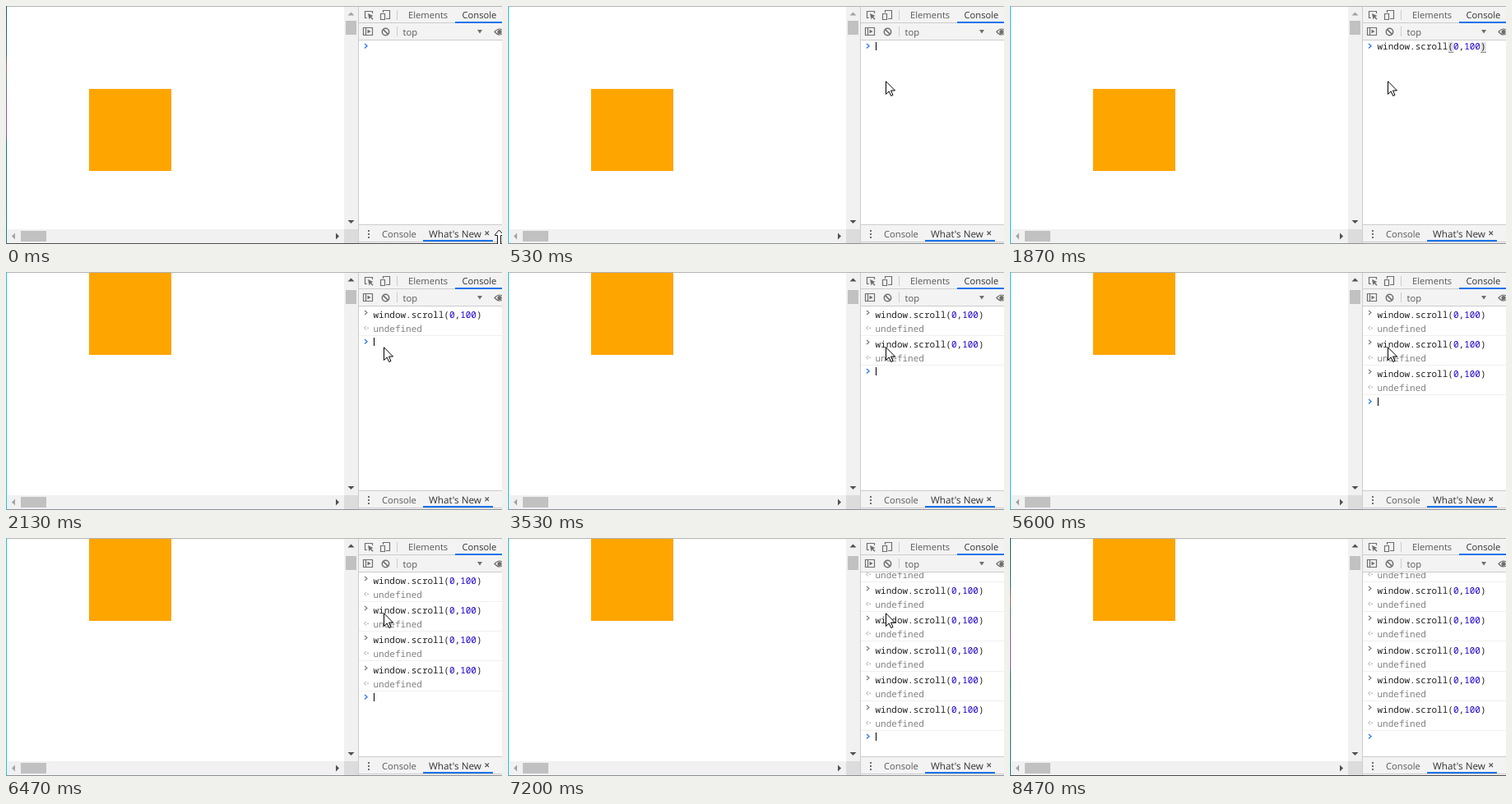
Write an HTML page that moves like this. It is 603 by 290 pixels and loops after 8.59 s.

```html
<!DOCTYPE html>
<html lang="en">
<head>
<meta charset="utf-8">
<title>Scrolling from the console</title>
<style>
  html, body { margin: 0; width: 603px; height: 290px; overflow: hidden; background: #fff; }
  svg { display: block; }
  text { white-space: pre; text-rendering: geometricPrecision; }
  .ui { font: 11.2px "Open Sans", "Noto Sans", sans-serif; fill: #5a5a5a; }
  .ui .active { fill: #333; }
  .code { font: 11px "Noto Sans Mono", "DejaVu Sans Mono", monospace; fill: #222; }
  .num { fill: #1c00cf; }
  .result { fill: #808080; }
  .icon { fill: none; stroke: #6e6e6e; stroke-width: 1.2; }
</style>
</head>
<body>
<svg width="603" height="290" viewBox="0 0 603 290">
  <defs>
    <linearGradient id="desktop" x1="0" y1="0" x2="0" y2="1">
      <stop offset="0" stop-color="#17616b"/>
      <stop offset=".2" stop-color="#2b6f78"/>
      <stop offset=".26" stop-color="#b0695f"/>
      <stop offset=".3" stop-color="#4b7f86"/>
      <stop offset=".42" stop-color="#8a5a9c"/>
      <stop offset=".54" stop-color="#8a5a9c"/>
      <stop offset=".58" stop-color="#17757a"/>
      <stop offset="1" stop-color="#1d8080"/>
    </linearGradient>
    <clipPath id="logArea"><path d="M429 42H603V266H429Z"/></clipPath>
  </defs>
  <path fill="#fff" d="M0 0H603V290H0Z"/>

  <rect id="box" x="101" y="101" width="100" height="100" fill="#ffa500"/>

  <g id="scrollbars">
    <path fill="#f1f1f1" d="M411 1H428V272H411ZM1 272H411V289H1Z"/>
    <path fill="#dcdcdc" d="M411 272H428V289H411Z"/>
    <rect id="thumb" x="413" y="18" width="13" height="17" fill="#c1c1c1"/>
    <path fill="#c1c1c1" d="M18 274H49V287H18Z"/>
    <path id="upArrow" d="M415.5 11.5L419.5 7.5L423.5 11.5Z"/>
    <path fill="#505050" d="M415.5 261L419.5 265L423.5 261ZM401 276.5L405 280.5L401 284.5Z"/>
    <path fill="#a3a3a3" d="M11 276.5L7 280.5L11 284.5Z"/>
  </g>

  <g id="log" clip-path="url(#logArea)">
    <g id="rows"></g>
    <g id="prompt">
      <path d="M436 46L439 48.7L436 51.4" fill="none" stroke="#367cf1" stroke-width="1.4"/>
      <g id="typed">
        <path fill="#e2e2e2" d="M532.8 44h6.6v12h-6.6zM572.2 44h6.6v12h-6.6z"/>
        <path fill="#8c8c8c" d="M533 56h6v1h-6zM572 56h7v1h-7z"/>
        <text class="code" x="446.5" y="53">window.scroll(<tspan class="num">0</tspan>,<tspan class="num">100</tspan>)</text>
      </g>
      <rect id="caret" x="447" y="44" width="1" height="10" fill="#000"/>
    </g>
  </g>

  <g id="toolbars">
    <path fill="#f3f3f3" d="M429 1H603V41H429ZM429 267H603V289H429Z"/>
    <path fill="#ccc" d="M428 1h1V289h-1zM429 20H603v1H429zM429 41H603v1H429zM429 266H603v1H429zM429 287H603v1H429zM475 5h1v12h-1zM475 25h1v12h-1z"/>
    <path fill="#1a73e8" d="M546 19H603v2H546zM507 285H592v2H507z"/>
    <g class="icon">
      <path d="M439 14.5H436.5V6.5H445.5V9"/>
      <path d="M458.5 8V5.5H466.5V15.5H462M455.5 9.5H460.5V16.5H455.5Z"/>
      <path d="M434.5 26.5H445.5V35.5H434.5ZM437.5 26.5V35.5"/>
      <circle cx="461.5" cy="31.5" r="4.2" stroke-width="1.5"/>
      <path d="M458.6 28.6L464.4 34.4" stroke-width="1.5"/>
      <path d="M594 31.5Q600 24.5 606 31.5Q600 38.5 594 31.5Z"/>
    </g>
    <path fill="#6e6e6e" d="M440 9L446.5 12L444 13L446.5 15.8L445.5 16.8L442.8 14L441.5 16.5ZM439.5 28.5L443.5 31L439.5 33.5ZM573 29H579L576 33.5Z"/>
    <circle cx="600" cy="31.5" r="2.6" fill="#6e6e6e"/>
    <path fill="#6e6e6e" d="M440 273h2v2h-2zM440 277h2v2h-2zM440 281h2v2h-2z"/>
    <g class="ui">
      <text x="489" y="15">Elements</text>
      <text class="active" x="554.5" y="15">Console</text>
      <text x="482.5" y="36">top</text>
      <text x="457" y="282">Console</text>
      <text class="active" x="514" y="282" font-size="11.7" style="font-size:11.7px">What's New</text>
    </g>
    <path d="M582.5 274.5L587 279M587 274.5L582.5 279" stroke="#555" stroke-width="1.1"/>
  </g>

  <path fill="#b4b4b4" d="M0 0H603V1H0Z"/>
  <rect id="bottomEdge" y="289" width="603" height="1"/>
  <rect id="leftEdge" width="1" height="290"/>

  <path id="resizeCursor" fill="#fff" stroke="#111" d="M599.5 273L604.5 278.5V279.5H601.5V291H597.5V279.5H594.5V278.5Z"/>
  <path id="arrowCursor" fill="#fff" stroke="#000" stroke-linejoin="miter" d="M.5 .8V16.5L4.2 13L6.7 18.5L9 17.5L6.5 12H11.5Z"/>
</svg>
<script>
const LOOP = 8590, ROW = 36.2, BLINK = 530, STEP = 67;
const FOCUS = 135, BLUR = 8470, MOVE_IN = 70, MOVE_OUT = 7730;
const REST = [459, 91];

// Console states: start, finished commands, command typed, start of caret blinking
const states = [
  [0, 0, false, 140],
  [1330, 0, true],
  [2130, 1, false],
  [3000, 1, true],
  [3530, 2, false, 3470],
  [4200, 2, true],
  [4730, 3, false],
  [5200, 3, true],
  [5600, 3, false],
  [5670, 4, false],
  [5930, 4, true],
  [6470, 4, false],
  [6530, 5, false],
  [6930, 5, true],
  [7200, 6, false]
];

const $ = id => document.getElementById(id);
const show = (id, on) => $(id).setAttribute("display", on ? "inline" : "none");
const set = (id, name, value) => $(id).setAttribute(name, value);
const place = (id, x, y) => set(id, "transform", `translate(${x} ${y})`);
const mix = (a, b, p) => a.map((v, i) => Math.round(v + (b[i] - v) * p));

function rowMarkup(i) {
  return `<g transform="translate(0 ${Math.round(i * ROW)})">
    <path d="M436 47L439 49.5L436 52" fill="none" stroke="#777" stroke-width="1.1"/>
    <text class="code" x="446.5" y="56">window.scroll(<tspan class="num">0</tspan>,<tspan class="num">100</tspan>)</text>
    <path d="M438 66L435.5 68.2L438 70.4" fill="none" stroke="#aaa"/>
    <circle cx="440" cy="68.2" r=".8" fill="#999"/>
    <text class="code result" x="446.5" y="73">undefined</text>
    <path fill="#f0f0f0" d="M429 77H603V78H429Z"/>
  </g>`;
}
$("rows").innerHTML = Array.from({ length: 6 }, (_, i) => rowMarkup(i)).join("");

function drawConsole(t) {
  const [start, done, typed, blinkStart = start] = states.findLast(s => s[0] <= t);
  const shift = done === 6 ? -24 : 0;
  const focused = t >= 140 && t < BLUR;
  [...$("rows").children].forEach((row, i) => row.setAttribute("display", i < done ? "inline" : "none"));
  place("rows", 0, shift);
  place("prompt", 0, Math.round(done * ROW) + shift);
  show("typed", typed);
  set("caret", "x", typed ? 579 : 447);
  show("caret", focused && Math.floor((t - blinkStart) / BLINK) % 2 === 0);

  const scrolled = done > 0;
  set("box", "y", scrolled ? 1 : 101);
  set("thumb", "y", scrolled ? 22 : 18);
  set("upArrow", "fill", scrolled ? "#505050" : "#a3a3a3");
}

function drawPointer(t) {
  const stepsSince = start => Math.floor((t - start) / STEP) + 1;
  let at = REST;
  if (t < MOVE_OUT) {
    const p = Math.min(1, stepsSince(MOVE_IN) / 7);
    at = mix([598, 272], REST, 1 - (1 - p) ** 2);
  } else {
    const p = Math.min(1, stepsSince(MOVE_OUT) / 8);
    at = mix(REST, [96, 284], p ** 1.4);
  }
  place("arrowCursor", ...at);
  show("arrowCursor", t >= MOVE_IN && stepsSince(MOVE_OUT) < 9);
  show("resizeCursor", t < MOVE_IN);
}

function draw(t) {
  const focused = t >= FOCUS && t < BLUR;
  set("leftEdge", "fill", focused ? "#1cc4e6" : "url(#desktop)");
  set("bottomEdge", "fill", focused ? "#8a8f94" : "#4a4a4a");
  drawConsole(t);
  drawPointer(t);
}

const began = performance.now();
function tick() {
  draw((performance.now() - began) % LOOP);
  requestAnimationFrame(tick);
}
tick();
</script>
</body>
</html>
```
